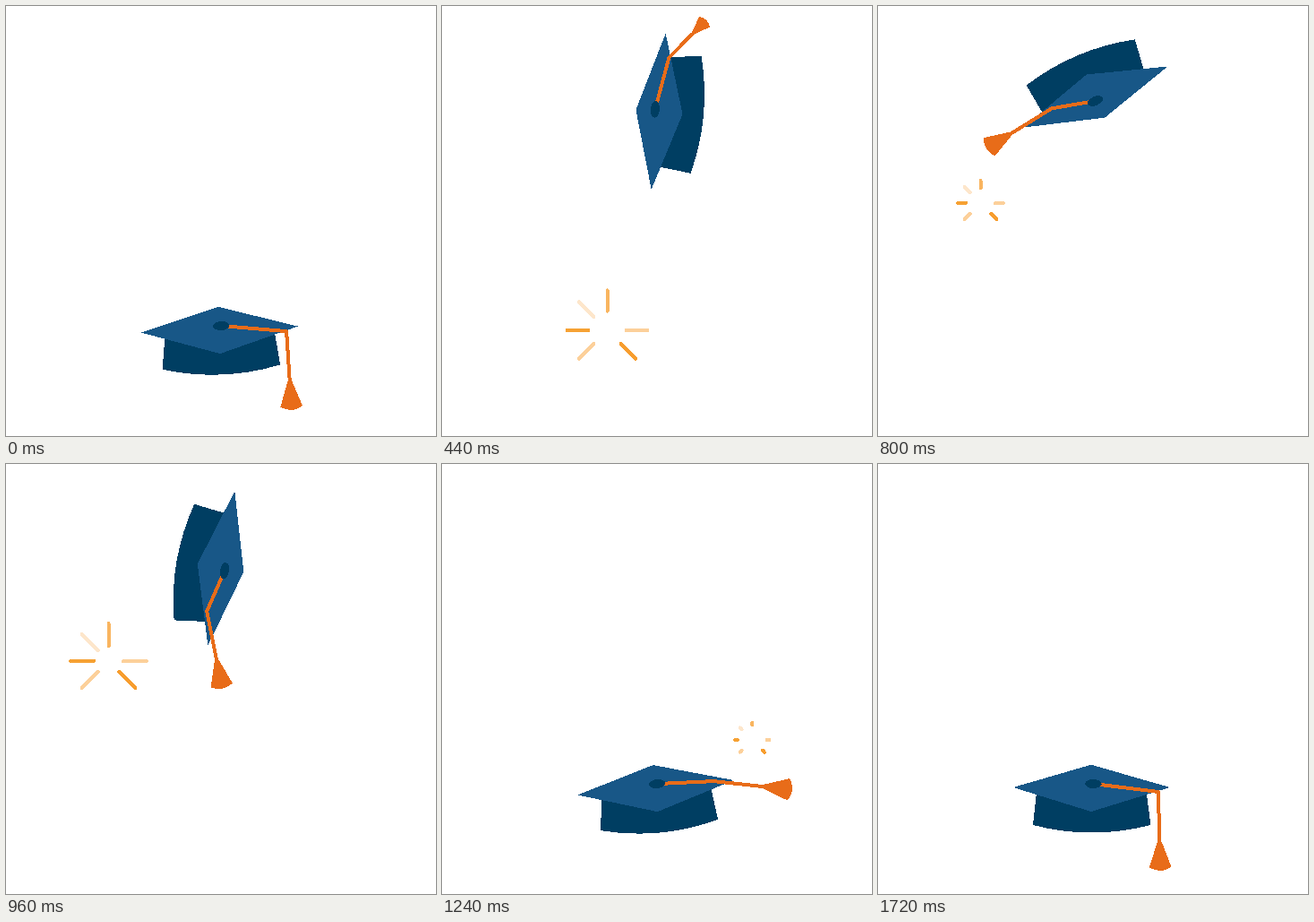
An HTML page for the animation above (1.96 s loop, 480 by 480 pixels).

```html
<!DOCTYPE html>
<html lang="en">
<head>
<meta charset="utf-8">
<title>Graduation cap toss</title>
<style>
  html, body { margin: 0; width: 100%; height: 100%; overflow: hidden; background: #fff; }
  svg { display: block; width: 100%; height: 100%; shape-rendering: crispEdges; }
  .base, .button { fill: #003e62; }
  .board { fill: #185787; }
  .cord { fill: none; stroke: #e86c19; stroke-width: 4; stroke-linejoin: round; }
  .tassel { fill: #e86c19; }
  .burst { stroke-width: 4; stroke-linecap: round; }
</style>
</head>
<body>
<svg viewBox="0 0 480 480">
  <g id="bursts"></g>
  <g id="cap">
    <path class="base" d="M-64 8 L-68 43 Q-2 60 63.5 43 L59 8Z"/>
    <path class="board" d="M-90 1 L-3 -24.3 L85 1 L-3 28Z"/>
    <path class="cord" id="cord"/>
    <path class="tassel" id="tassel" d="M0 -2.5 L28 -12.3 Q36 0 28 12.3 L0 2.5Z"/>
    <ellipse class="button" cx="-.5" cy="-3" rx="9.3" ry="5"/>
  </g>
</svg>
<script>
// Time is counted in steps of 40 ms; the cap lands at step LAND and rests from REST on.
const LOOP = 1960, STEP = 40, LAND = 31, REST = 42;
const byId = id => document.getElementById(id);

const ramp = (n, from, to) => Math.min(1, Math.max(0, (n - from) / (to - from)));
const smooth = u => u * u * (3 - 2 * u);
const easeOut = (u, power) => 1 - (1 - u) ** power;

function capPose(n) {
  const rise = smooth(ramp(n, 0, 13) ** .88);
  const fall = ramp(n, 13, LAND) ** 5.5;
  const settle = smooth(ramp(n, LAND, REST));
  const foreshorten = ramp(n, 0, 20) - ramp(n, 26, 34);
  return {
    y: 360 - 258 * (rise - fall),
    spin: -2.3 - 363.1 * ramp(n, 2.8, LAND) ** 1.2 + 5.4 * settle,
    bendX: 72 - 24.5 * foreshorten,
    bendY: 6 + 3 * ramp(n, 0, 27) - 9 * ramp(n, 27, LAND) + 6 * settle,
    swing: 88.5 - 113.8 * (easeOut(ramp(n, 4.5, 27), 1.65) - smooth(ramp(n, 27, 37.5))),
    size: 1 - .33 * Math.sin(Math.PI * ramp(n, 0, 22)) ** 2
  };
}

function drawCap(n) {
  const { y, spin, bendX, bendY, swing, size } = capPose(n);
  const angle = swing * Math.PI / 180;
  const neckX = bendX + 56 * size * Math.cos(angle);
  const neckY = bendY + 56 * size * Math.sin(angle);
  byId('cap').setAttribute('transform', `translate(240.9 ${y}) rotate(${spin})`);
  byId('cord').setAttribute('d', `M-.5 -3 L${bendX} ${bendY} L${neckX} ${neckY}`);
  byId('tassel').setAttribute('transform',
    `translate(${neckX} ${neckY}) rotate(${swing}) scale(${size})`);
}

const BURST_STEPS = 11;
const rayColors = { 0: '#fcd09a', 45: '#f79d2e', 135: '#fcd09a',
  180: '#f6a133', 225: '#fde6cb', 270: '#f9b560' };

function makeBurst(x, y, start) {
  const group = document.createElementNS('http://www.w3.org/2000/svg', 'g');
  group.setAttribute('class', 'burst');
  group.setAttribute('transform', `translate(${x} ${y})`);
  group.innerHTML = Object.entries(rayColors).map(([angle, color]) =>
    `<line stroke="${color}" transform="rotate(${angle})"/>`).join('');
  byId('bursts').append(group);
  return { group, start };
}
const bursts = [
  makeBurst(184.5, 362, 5),
  makeBurst(114.5, 220, 19),
  makeBurst(346.3, 308, LAND)
];

function drawBurst({ group, start }, n) {
  const k = n - start;
  group.style.display = k >= 0 && k <= BURST_STEPS ? '' : 'none';
  const inner = 16.5 + 31 * smooth(ramp(k, 5, 9));
  const outer = 16 + 32 * easeOut(ramp(k, -.5, 9), 2);
  for (const ray of group.children) {
    ray.setAttribute('x1', inner);
    ray.setAttribute('x2', outer);
  }
}

function draw(time) {
  const n = Math.floor(time % LOOP / STEP);
  drawCap(n);
  bursts.forEach(burst => drawBurst(burst, n));
}

let origin;
function tick(now) {
  origin ??= now;
  draw(now - origin);
  requestAnimationFrame(tick);
}
draw(0);
requestAnimationFrame(tick);
</script>
</body>
</html>
```
